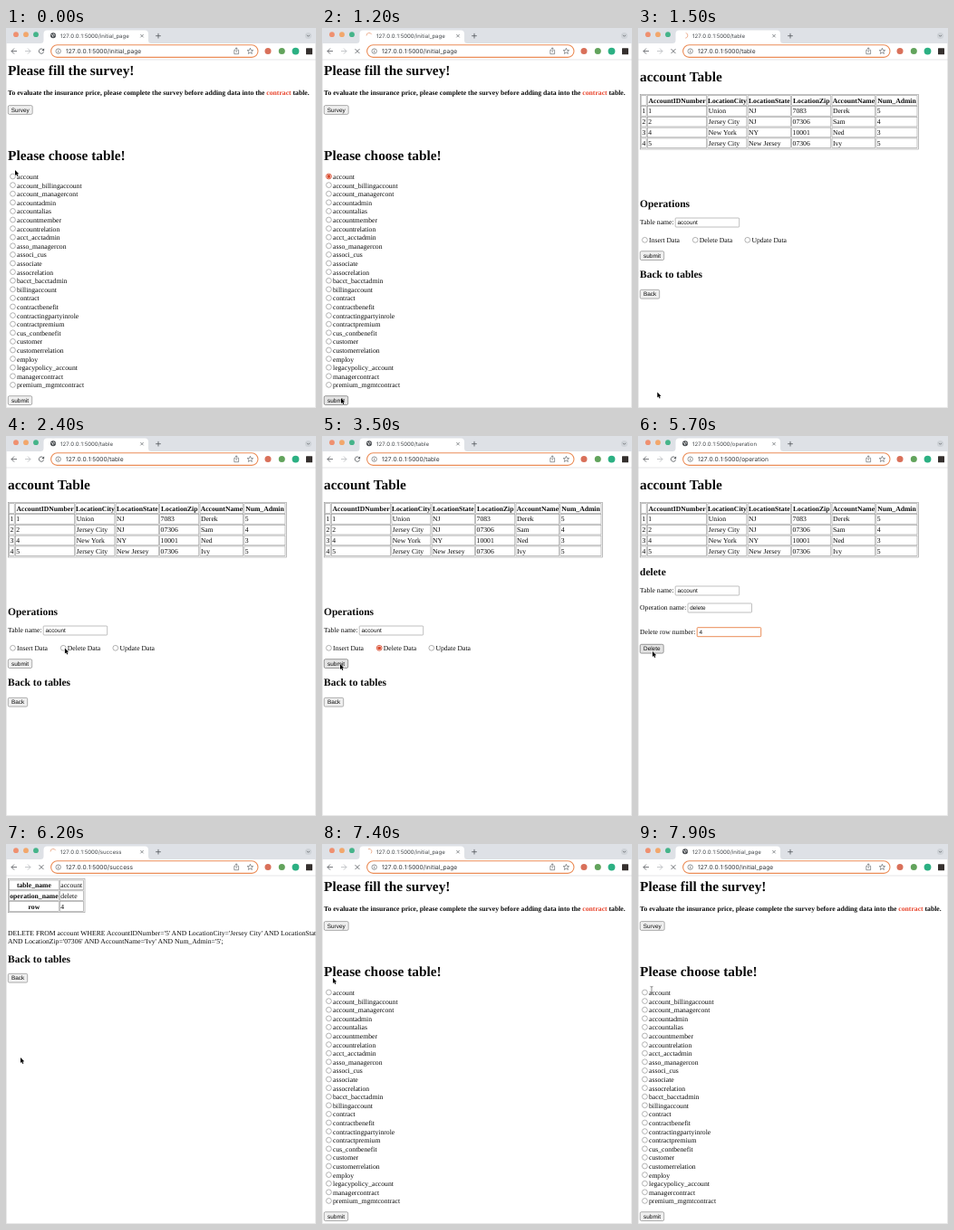
An HTML page with a canvas for the animation above (8 s loop, 342 by 420 pixels).

```html
<!DOCTYPE html>
<html lang="en">
<head>
<meta charset="utf-8">
<title>Insurance tables</title>
<style>
html, body { margin: 0; width: 100%; height: 100%; overflow: hidden; background: #fff; }
canvas { display: block; width: 342px; height: 420px; }
</style>
</head>
<body>
<canvas id="stage"></canvas>
<script>
const W = 342, H = 420, LOOP = 8000, TAU = Math.PI * 2;
const canvas = document.getElementById('stage');
const ctx = canvas.getContext('2d');
const dpr = window.devicePixelRatio || 1;
canvas.width = W * dpr;
canvas.height = H * dpr;

const SERIF = '"Liberation Serif", "Times New Roman", serif';
const SANS = '"Liberation Sans", Arial, sans-serif';
const UI = 'Inter, Roboto, sans-serif';
const BODY = '7.68px ' + SERIF;
const BOLD = 'bold ' + BODY;
const H1 = 'bold 15.36px ' + SERIF;
const H2 = 'bold 11.52px ' + SERIF;
const FIELD = '6.4px ' + SANS;
const ORANGE = '#eb8d58', RED = '#e8442c', INK = '#505458', EDGE = '#969696';

const TABLES = ['account', 'account_billingaccount', 'account_managercont', 'accountadmin',
  'accountalias', 'accountmember', 'accountrelation', 'acct_acctadmin', 'asso_managercon',
  'associ_cus', 'associate', 'assocrelation', 'bacct_bacctadmin', 'billingaccount', 'contract',
  'contractbenefit', 'contractingpartyinrole', 'contractpremium', 'cus_contbenefit', 'customer',
  'customerrelation', 'employ', 'legacypolicy_account', 'managercontract', 'premium_mgmtcontract'];

const HEAD = ['', 'AccountIDNumber', 'LocationCity', 'LocationState', 'LocationZip', 'AccountName', 'Num_Admin'];
const ROWS = [
  ['1', '1', 'Union', 'NJ', '7083', 'Derek', '5'],
  ['2', '2', 'Jersey City', 'NJ', '07306', 'Sam', '4'],
  ['3', '4', 'New York', 'NY', '10001', 'Ned', '3'],
  ['4', '5', 'Jersey City', 'New Jersey', '07306', 'Ivy', '5']
];
const COLS = [3.2, 10, 76.5, 120.7, 169.3, 213.6, 262.5, 308.8];

// [start, page]
const PAGES = [[0, 'initial_page'], [1500, 'table'], [3800, 'operation'], [6050, 'success'], [7300, 'initial_page']];
const LOADING = [[1050, 2000], [3550, 3950], [5850, 6450], [7050, 8000]];
const SPINNING = [[1050, 1650], [3700, 3950], [5850, 6300], [7300, 7600]];
const BEAM = [[4150, 4980], [7750, 8000]];
// [time, x, y]
const PATH = [[0, 10, 157], [200, 8, 162], [450, 8, 162], [900, 21, 409], [1450, 21, 409],
  [1850, 28, 264], [2300, 65, 234.5], [2900, 64, 234], [3300, 20, 252], [3850, 20, 252],
  [4250, 79, 213], [4850, 79, 213], [5150, 42, 286], [5500, 16, 238], [5900, 16, 238],
  [6200, 16, 236], [6450, 16, 236], [6900, 12, 148], [7400, 12, 148], [7800, 15, 161], [8000, 15, 161]];

const within = (t, spans) => spans.some(([a, b]) => t >= a && t < b);

function pointerAt(t) {
  let i = 0;
  while (i < PATH.length - 2 && t >= PATH[i + 1][0]) i++;
  const [t0, x0, y0] = PATH[i], [t1, x1, y1] = PATH[i + 1];
  const k = (t - t0) / (t1 - t0), e = k * k * (3 - 2 * k);
  return [x0 + (x1 - x0) * e, y0 + (y1 - y0) * e];
}

function text(s, x, y, font = BODY, color = '#0c0c0c', align = 'left') {
  ctx.font = font;
  ctx.fillStyle = color;
  ctx.textAlign = align;
  ctx.fillText(s, x, y);
  return x + ctx.measureText(s).width;
}

function box(x, y, w, h, r, fill, stroke, lw = 0.6) {
  ctx.beginPath();
  ctx.roundRect(x, y, w, h, r);
  if (fill) { ctx.fillStyle = fill; ctx.fill(); }
  if (stroke) { ctx.strokeStyle = stroke; ctx.lineWidth = lw; ctx.stroke(); }
}

function disc(x, y, r, fill, stroke, lw = 0.6) {
  ctx.beginPath();
  ctx.arc(x, y, r, 0, TAU);
  if (fill) { ctx.fillStyle = fill; ctx.fill(); }
  if (stroke) { ctx.strokeStyle = stroke; ctx.lineWidth = lw; ctx.stroke(); }
}

function line(color, lw, ...pts) {
  ctx.beginPath();
  pts.forEach(([x, y], i) => i ? ctx.lineTo(x, y) : ctx.moveTo(x, y));
  ctx.strokeStyle = color;
  ctx.lineWidth = lw;
  ctx.stroke();
}

function button(label, x, y, w, hot) {
  box(x + 0.3, y + 0.3, w - 0.6, 9.8, 1.5, hot ? '#e3e3e3' : '#efefef', hot ? '#6a6a6a' : '#858585', 0.65);
  text(label, x + w / 2, y + 7.4, FIELD, '#0c0c0c', 'center');
}

function input(value, x, y, focus) {
  box(x, y, 70.5, 10, 0.8, '#fff', focus ? ORANGE : EDGE, focus ? 1 : 0.6);
  return text(value, x + 2.2, y + 7.4, FIELD);
}

function radio(x, y, on) {
  disc(x, y, 2.9, '#fff', on ? '#d8482b' : '#808080', on ? 0.9 : 0.6);
  if (on) disc(x, y, 1.9, '#d8482b');
}

function cell(x, y, w, h) {
  ctx.strokeStyle = EDGE;
  ctx.lineWidth = 0.6;
  ctx.strokeRect(x, y, w, h);
}

function grid(cols, y, rows, draw) {
  const last = cols[cols.length - 1], pitch = 11.8;
  cell(2.3, y, last - 1.7, rows * pitch + 1.7);
  for (let r = 0; r < rows; r++) {
    for (let c = 0; c < cols.length - 1; c++) {
      const x = cols[c] + 0.4, w = cols[c + 1] - cols[c] - 1.2, top = y + 1.4 + r * pitch;
      cell(x, top, w, pitch - 1.1);
      draw(r, c, x, w, top + 7.9);
    }
  }
}

function accountTable() {
  text('account Table', 2, 59, H1);
  grid(COLS, 73.3, 5, (r, c, x, w, y) => {
    if (r) text(ROWS[r - 1][c], x + 0.9, y);
    else text(HEAD[c], x + w / 2, y, BOLD, '#0c0c0c', 'center');
  });
}

const pages = {
  initial_page(t) {
    text('Please fill the survey!', 2, 52, H1);
    let x = text('To evaluate the insurance price, please complete the survey before adding data into the ', 2, 73.6, BOLD);
    x = text('contract', x, 73.6, BOLD, RED);
    text(' table.', x, 73.6, BOLD);
    button('Survey', 2, 85.3, 27.5);
    text('Please choose table!', 2, 145.5, H1);
    TABLES.forEach((name, i) => {
      const y = 164 + i * 9.6;
      radio(7.5, y, i === 0 && t >= 350 && t < 1500);
      text(name, 12, y + 2.9);
    });
    button('submit', 2, 406.4, 27, t >= 850 && t < 1500);
  },

  table(t) {
    accountTable();
    text('Operations', 2, 198, H2);
    text('Table name:', 2, 217.3);
    input('account', 41.2, 210);
    ['Insert Data', 'Delete Data', 'Update Data'].forEach((name, i) => {
      const x = [7.5, 63.2, 120.8][i];
      radio(x, 234.3, i === 1 && t >= 2800);
      text(name, x + 4.6, 237.1);
    });
    button('submit', 2, 246.4, 27, t >= 3250);
    text('Back to tables', 2, 276, H2);
    button('Back', 2, 289, 22);
  },

  operation(t) {
    accountTable();
    text('delete', 2, 153.8, H2);
    text('Table name:', 2, 173.3);
    input('account', 41.2, 166);
    text('Operation name:', 2, 192.4);
    input('delete', 55, 185);
    text('Delete row number:', 2, 219.2);
    const focus = t >= 4600;
    const end = input(t >= 4900 ? '4' : '', 65.2, 211.7, focus);
    if (focus && t < 5400) line('#000', 0.5, [end + 0.3, 213.5], [end + 0.3, 220]);
    button('Delete', 2, 230, 26.5, t >= 5450);
  },

  success(t) {
    const info = [['table_name', 'account'], ['operation_name', 'delete'], ['row', '4']];
    grid([3.2, 59, 86.4], 38.6, 3, (r, c, x, w, y) => {
      if (c) text(info[r][1], x + 0.9, y);
      else text(info[r][0], x + w / 2, y, BOLD, '#0c0c0c', 'center');
    });
    text("DELETE FROM account WHERE AccountIDNumber='5' AND LocationCity='Jersey City' AND LocationState='New Jersey'", 2, 100.6);
    text("AND LocationZip='07306' AND AccountName='Ivy' AND Num_Admin='5';", 2, 109.6);
    text('Back to tables', 2, 131, H2);
    button('Back', 2, 143, 22, t >= 6850);
  }
};

function globe(x, y) {
  disc(x, y, 3, '#44484c');
  line('#fff', 0.9, [x - 2.2, y - 0.9], [x - 0.3, y - 0.2], [x - 0.1, y + 1.9]);
  line('#fff', 0.8, [x + 0.4, y - 2], [x + 0.9, y - 0.6], [x + 2.3, y - 0.2]);
}

function cross(x, y, r, color, lw) {
  line(color, lw, [x - r, y - r], [x + r, y + r]);
  line(color, lw, [x + r, y - r], [x - r, y + r]);
}

function arrow(x, y, dir, color) {
  line(color, 0.8, [x - 3 * dir, y], [x + 3 * dir, y]);
  line(color, 0.8, [x, y - 3], [x + 3 * dir, y], [x, y + 3]);
}

function reload(x, y) {
  ctx.beginPath();
  ctx.arc(x, y, 2.7, 0.3, 5.4);
  ctx.strokeStyle = INK;
  ctx.lineWidth = 0.8;
  ctx.stroke();
  ctx.beginPath();
  ctx.moveTo(x + 3.1, y - 3.2);
  ctx.lineTo(x + 3.1, y - 0.3);
  ctx.lineTo(x + 0.3, y - 0.3);
  ctx.fillStyle = INK;
  ctx.fill();
}

function star(x, y) {
  ctx.beginPath();
  for (let i = 0; i < 10; i++) {
    const a = i * TAU / 10 - TAU / 4, r = i % 2 ? 1.5 : 3.4;
    ctx.lineTo(x + r * Math.cos(a), y + r * Math.sin(a));
  }
  ctx.closePath();
  ctx.strokeStyle = INK;
  ctx.lineWidth = 0.6;
  ctx.stroke();
}

function browser(t, page) {
  const url = '127.0.0.1:5000/' + page;
  ctx.fillStyle = '#dee1e6';
  ctx.fillRect(0, 0, W, 17);
  ['#ef9070', '#f2a76c', '#45b48a'].forEach((c, i) => disc(11 + 11 * i, 7.2, 2.9, c));

  ctx.beginPath();
  ctx.moveTo(38, 17);
  ctx.quadraticCurveTo(41.5, 17, 41.5, 13.5);
  ctx.lineTo(41.5, 6.5);
  ctx.quadraticCurveTo(41.5, 2.6, 45.5, 2.6);
  ctx.lineTo(153, 2.6);
  ctx.quadraticCurveTo(157, 2.6, 157, 6.5);
  ctx.lineTo(157, 13.5);
  ctx.quadraticCurveTo(157, 17, 160.5, 17);
  ctx.fillStyle = '#fff';
  ctx.fill();

  if (within(t, SPINNING)) {
    const a = t / 1000 * TAU + 1.8;
    ctx.beginPath();
    ctx.arc(52, 8.3, 2.9, a, a + 2.8);
    ctx.strokeStyle = '#e9a07c';
    ctx.lineWidth = 0.8;
    ctx.stroke();
  } else globe(52, 8.3);

  ctx.fontKerning = 'none';
  text(url, 60, 10.8, '6.05px ' + UI, '#45494d');
  cross(150, 8.7, 1.7, '#5f6368', 0.7);
  line(INK, 0.8, [165.2, 8.7], [170.8, 8.7]);
  line(INK, 0.8, [168, 5.9], [168, 11.5]);
  disc(333.5, 8.5, 3.6, '#cfd3d8');
  line(INK, 0.7, [332, 7.8], [333.5, 9.3], [335, 7.8]);

  ctx.fillStyle = '#fff';
  ctx.fillRect(0, 17, W, 18);
  line('#d4d6d9', 0.6, [0, 35], [W, 35]);
  arrow(9, 25.6, -1, INK);
  arrow(24, 25.6, 1, '#b4b7ba');
  if (within(t, LOADING)) cross(39, 25.6, 2.5, INK, 0.8);
  else reload(39, 25.6);

  box(49.6, 18.8, 228.4, 13.6, 6.8, '#fff', ORANGE, 1.1);
  disc(57.7, 25.6, 2.7, null, INK, 0.6);
  line(INK, 0.7, [57.7, 25.2], [57.7, 27.2]);
  line(INK, 0.7, [57.7, 23.8], [57.7, 24.5]);
  text(url, 66, 28, '6.65px ' + UI, '#303336');
  ctx.fontKerning = 'auto';

  line(INK, 0.6, [253, 24.4], [251.8, 24.4], [251.8, 28.7], [256.6, 28.7], [256.6, 24.4], [255.4, 24.4]);
  line(INK, 0.6, [254.2, 27], [254.2, 21.8]);
  line(INK, 0.6, [252.7, 23.3], [254.2, 21.8], [255.7, 23.3]);
  star(269.4, 25.7);

  disc(289, 25.6, 3.5, '#d9705a');
  disc(304.3, 25.6, 3.5, '#62a35c');
  disc(319.5, 25.6, 3.9, '#2cb083');
  box(331, 22.2, 7, 7, 0.5, '#35302e');
}

function pointer(t) {
  const [x, y] = pointerAt(t);
  if (within(t, BEAM)) {
    line('#fff', 1.3, [x, y - 3.2], [x, y + 3.2]);
    line('#444', 0.6, [x, y - 3.2], [x, y + 3.2]);
    line('#444', 0.6, [x - 1.5, y - 3.6], [x, y - 3], [x + 1.5, y - 3.6]);
    line('#444', 0.6, [x - 1.5, y + 3.6], [x, y + 3], [x + 1.5, y + 3.6]);
    return;
  }
  const size = 0.86;
  ctx.beginPath();
  [[0, 0], [0, 7], [1.6, 5.6], [2.7, 8.1], [3.9, 7.6], [2.8, 5.1], [4.9, 5]]
    .forEach(([a, b]) => ctx.lineTo(x + a * size, y + b * size));
  ctx.closePath();
  ctx.lineJoin = 'round';
  ctx.strokeStyle = '#fff';
  ctx.lineWidth = 1;
  ctx.stroke();
  ctx.fillStyle = '#000';
  ctx.fill();
  ctx.lineJoin = 'miter';
}

function frame(now) {
  const t = now % LOOP;
  const page = PAGES.filter(p => t >= p[0]).pop()[1];
  ctx.setTransform(dpr, 0, 0, dpr, 0, 0);
  ctx.textRendering = 'geometricPrecision';
  ctx.fillStyle = '#fff';
  ctx.fillRect(0, 0, W, H);
  pages[page](t);
  browser(t, page);
  line('#d0d0d0', 0.6, [0.3, 17], [0.3, 419.7], [341.7, 419.7], [341.7, 17]);
  pointer(t);
  requestAnimationFrame(frame);
}
requestAnimationFrame(frame);
</script>
</body>
</html>
```
